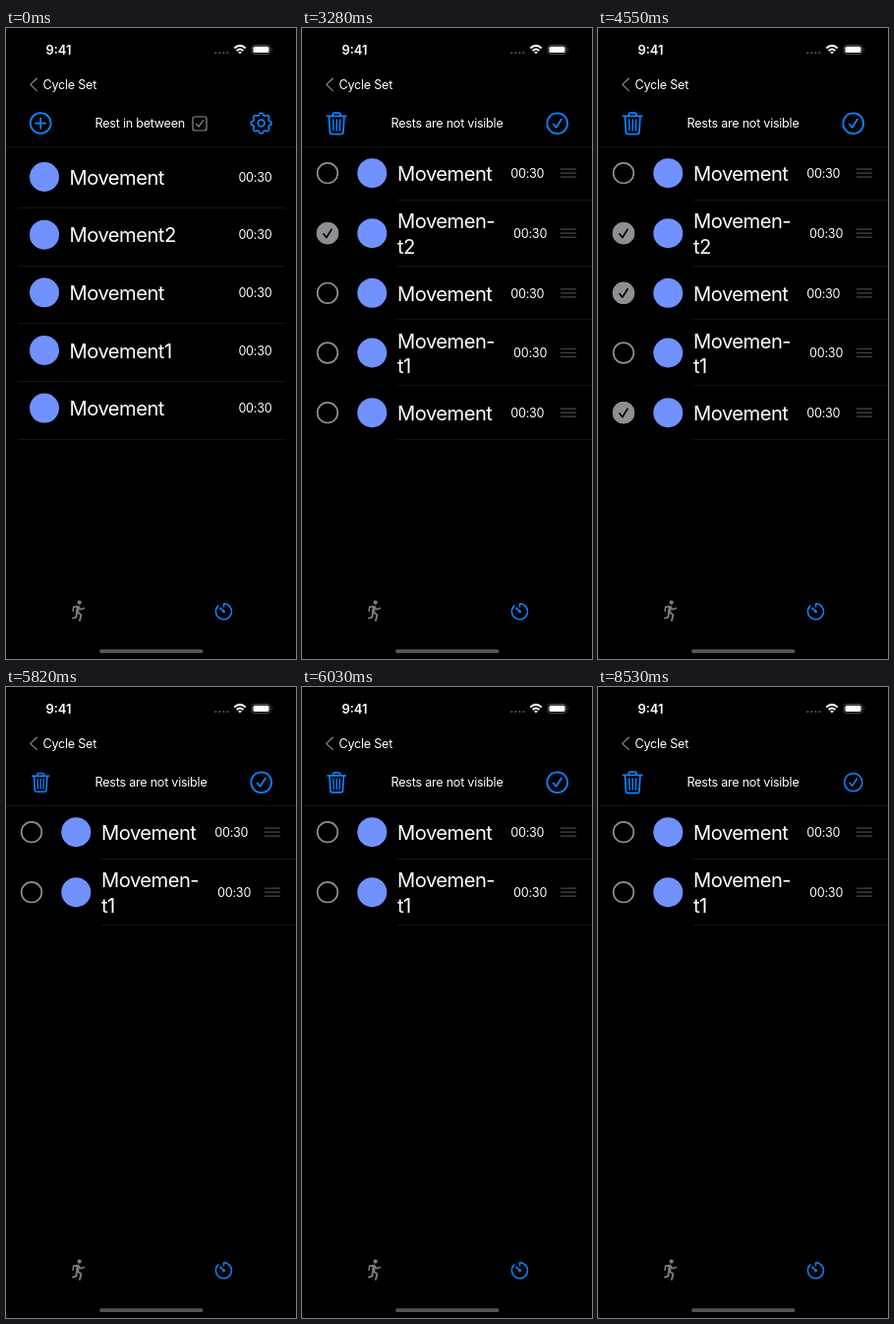
An HTML page for the animation above (9.69 s loop, 295 by 640 pixels).

```html
<!DOCTYPE html>
<html lang="en">
<head>
<meta charset="utf-8">
<title>Cycle Set</title>
<style>
  html, body { margin: 0; width: 100%; height: 100%; overflow: hidden; background: #000; }
  svg { display: block; width: 100vw; height: 100vh; }
  text {
    font: 12.6px Inter, Roboto, sans-serif;
    font-optical-sizing: none;
    letter-spacing: -.02em;
    fill: #fff;
  }
  .title { font-size: 20.2px; letter-spacing: -.026em; }
  .clock { font-size: 13px; font-weight: 600; letter-spacing: 0; }
  .line { fill: none; stroke-linecap: round; stroke-linejoin: round; }
  .blue { stroke: #0a84ff; }
  .gray { stroke: #8e8e93; }
</style>
</head>
<body>
<svg id="stage" viewBox="0 0 295 640"></svg>
<script>
const LOOP = 9690;
const stage = document.getElementById('stage');

const path = (d, cls, width) => `<path class="line ${cls}" d="${d}" stroke-width="${width}"/>`;
const ring = (x, y, r, cls, width) =>
  `<circle class="line ${cls}" cx="${x}" cy="${y}" r="${r}" stroke-width="${width}"/>`;
const disc = (x, y, r, fill) => `<circle cx="${x}" cy="${y}" r="${r}" fill="${fill}"/>`;
const text = (x, y, s, cls = '') => `<text x="${x}" y="${y}" class="${cls}">${s}</text>`;
const rule = (x1, x2, y) => `<path d="M${x1} ${y}H${x2}" stroke="#141415" stroke-width="1"/>`;
const group = (id, body) => `<g id="${id}">${body}</g>`;

function gear() {
  let d = '';
  for (let i = 0; i < 160; i++) {
    const a = i / 160 * Math.PI * 2;
    const r = 9.35 + 1.05 * Math.tanh(2 * Math.cos(8 * a));
    d += (i ? 'L' : 'M') + (r * Math.sin(a)).toFixed(2) + ' ' + (-r * Math.cos(a)).toFixed(2);
  }
  return path(d + 'Z', 'blue', 1.7) + ring(0, 0, 3.4, 'blue', 1.7);
}

const trash =
  path('M-9.7 -7.4H9.7M-3.9 -7.6V-8.8Q-3.9 -10.6 -2.2 -10.6H2.2Q3.9 -10.6 3.9 -8.8V-7.6', 'blue', 1.8) +
  path('M-7.7 -7.2L-6.8 8.6Q-6.6 10.8 -4.5 10.8H4.5Q6.6 10.8 6.8 8.6L7.7 -7.2', 'blue', 1.8) +
  path('M-3.5 -3.8L-3.1 7.2M0 -3.8V7.2M3.5 -3.8L3.1 7.2', 'blue', 1.5);

const done = ring(0, 0, 10.4, 'blue', 1.8) + path('M-4 .8L-1.2 4.2L4.2 -4.3', 'blue', 1.8);

function statusBar() {
  let s = text(40.4, 26.5, '9:41', 'clock');
  for (let i = 0; i < 4; i++) s += disc(213.3 + i * 4, 25.2, 1.15, '#4c4c4e');
  s += '<g fill="none" stroke="#fff" stroke-width="2">' +
    '<path d="M232.3 20.5Q238 15.2 243.7 20.5"/><path d="M234.6 23Q238 20 241.4 23"/></g>' +
    '<path d="M236 24.5Q238 22.9 240 24.5L238 26.6Z" fill="#fff"/>' +
    '<rect x="250.2" y="17.4" width="18.6" height="9" rx="2.7" fill="none" stroke="#666" stroke-width=".8"/>' +
    '<rect x="251.5" y="18.7" width="16" height="6.4" rx="1.6" fill="#fff"/>' +
    '<path d="M270 20.4Q271.5 21.9 270 23.4Z" fill="#777"/>';
  return s;
}

function tabBar() {
  const runner = disc(74.7, 582.7, 2.1, '#7c7c80') +
    '<g stroke="#7c7c80" class="line">' +
    '<path stroke-width="3.2" d="M73.2 587.8L72.6 592.4"/>' +
    '<path stroke-width="1.6" d="M68.2 591.4L68.6 587.4L73.2 586.6L76 589.8L79.4 588.6"/>' +
    '<path stroke-width="1.9" d="M73 592.8L76.4 595.2L75 601M71.8 593.6L71.4 597.6L68 598.6"/></g>';
  const timer = path('M215.8 586.1A8 8 0 1 0 221.5 583.8V587', 'blue', 1.5) +
    path('M221.8 592.2L218 588.3', 'blue', 1.8) + disc(221.6, 592, 1.4, '#0a84ff');
  return runner + timer +
    '<rect x="95" y="630.2" width="105.5" height="3.8" rx="1.9" fill="#555558"/>';
}

function listRow(name, i) {
  const y = 151 + i * 58.65;
  return disc(39, y, 15, '#7191ff') + text(64.5, y + 7.6, name, 'title') +
    text(236.4, y + 4.7, '00:30') + rule(12, 284, Math.round(y + 31) + .5);
}

const box = y => ring(26, y, 10.3, 'gray', 1.7);
const tick = y => disc(26, y, 11.2, '#8e8e93') +
  `<path class="line" stroke="#000" stroke-width="1.7" d="M22 ${y + .8}l2.9 3.5l5.2 -8.4"/>`;

// A row with a suffix breaks its name over two lines.
function editRow(y, suffix) {
  const grip = [-4, 0, 4].map(d => `M263 ${y + d}H279`).join('');
  const name = suffix
    ? text(97, y - 4.8, 'Movemen-', 'title') + text(97, y + 20.4, 't' + suffix, 'title')
    : text(97, y + 7.8, 'Movement', 'title');
  return box(y) + disc(71.3, y, 15, '#7191ff') + name +
    text(suffix ? 215.1 : 212.3, y + 4.7, '00:30') +
    `<path d="${grip}" stroke="#48484a" stroke-width="1.2"/>` +
    rule(97, 295, Math.floor(y + (suffix ? 33 : 27)) + .5);
}

const names = ['Movement', 'Movement2', 'Movement', 'Movement1', 'Movement'];

stage.innerHTML = statusBar() +
  path('M31.4 51L24.8 57.3L31.4 63.6', 'gray', 1.1) + text(37.6, 61.6, 'Cycle Set') +
  rule(0, 295, 120.5) + tabBar() +
  group('list',
    ring(35.2, 96.6, 10.4, 'blue', 1.8) + path('M30 96.6H40.4M35.2 91.4V101.8', 'blue', 1.8) +
    text(90.6, 101.4, 'Rest in between') +
    '<rect x="190" y="90" width="14" height="14" rx="2" class="line gray" stroke-width="1.2"/>' +
    path('M193.5 97.4L196 100.2L200.7 93.6', 'gray', 1.2) +
    group('gear', gear()) + names.map(listRow).join('')) +
  group('edit',
    group('trash', trash) + text(90.6, 101.4, 'Rests are not visible') + group('done', done) +
    editRow(147.2, '')) +
  group('full', editRow(208.2, '2') + editRow(268.8, '') + editRow(329.5, '1') +
    editRow(390.2, '') + tick(208.2) + group('tick3', tick(268.8)) + group('tick5', tick(390.2))) +
  group('rest', editRow(208.2, '1'));

const el = id => document.getElementById(id);
const show = (id, on) => el(id).setAttribute('display', on ? 'inline' : 'none');
const place = (id, x, y, k) => el(id).setAttribute('transform', `translate(${x} ${y}) scale(${k})`);

function trashScale(t) {
  if (t < 5700 || t >= 6230) return 1;
  if (t < 5930) return .87;
  return .87 + .13 * Math.floor((t - 5930) / 100 + 1) / 4;
}

function draw(t) {
  const editing = t >= 3280;
  show('list', !editing);
  show('edit', editing);
  show('full', editing && t < 5820);
  show('rest', t >= 5820);
  show('tick3', t >= 3850 && t < 5820);
  show('tick5', t >= 4550 && t < 5820);
  place('gear', 259.6, 96.6, t < 1540 ? 1 : .87);
  place('trash', 35.2, 96.8, trashScale(t));
  place('done', 259.7, 96.7, t < 8530 ? 1 : .87);
}

const start = performance.now();
function frame() {
  draw((performance.now() - start) % LOOP);
  requestAnimationFrame(frame);
}
frame();
</script>
</body>
</html>
```
